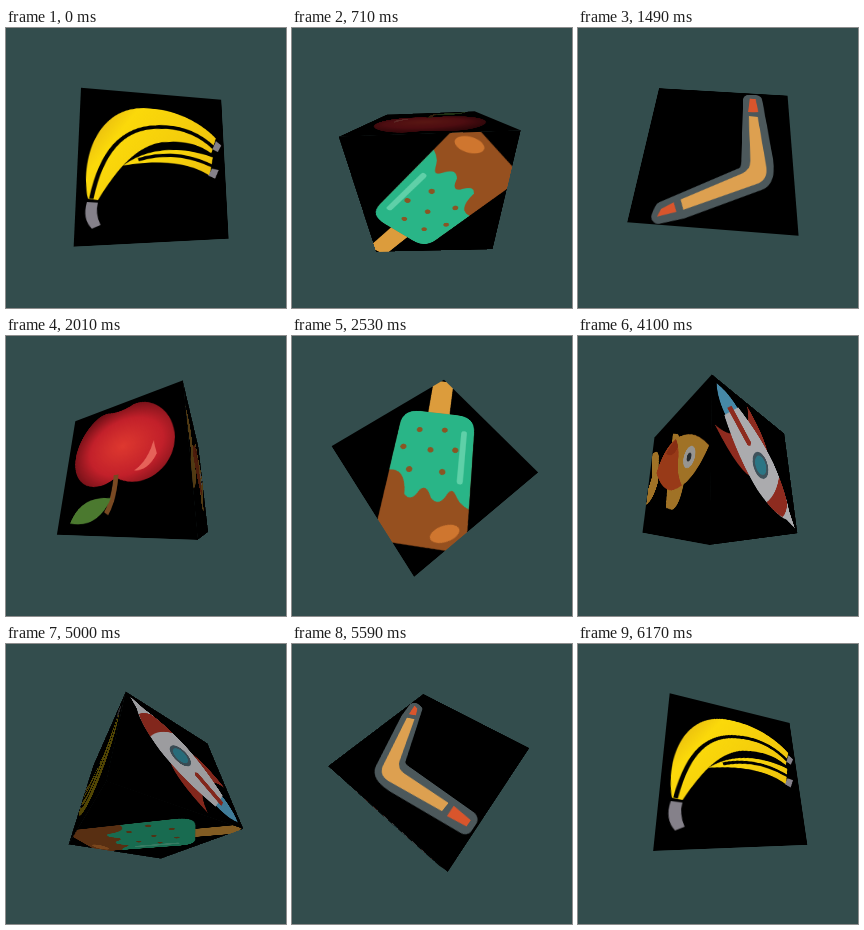
An HTML page that plays this animation: 280x280 px, repeating every 6.24 s.

```html
<!DOCTYPE html>
<html>
<head>
<meta charset="utf-8">
<title>Spinning cube</title>
<style>
  html, body { margin: 0; width: 100%; height: 100%; overflow: hidden; background: #334d4d; }
  #stage { position: absolute; left: 0; top: 0; width: 280px; height: 280px; overflow: hidden;
    perspective: 150px; perspective-origin: 140px 144px; }
  #cube { position: absolute; left: 140px; top: 144px; width: 0; height: 0; transform-style: preserve-3d; }
  #cube svg { position: absolute; left: -100px; top: -100px; width: 200px; height: 200px;
    background: #000; backface-visibility: hidden; }
</style>
</head>
<body>
<div id="stage"><div id="cube">

<!-- bananas -->
<svg viewBox="0 0 100 100" data-turn="rotateY(0deg)" data-axis="z" data-sign="-1">
  <defs><linearGradient id="peel" x1="0" y1="0" x2="1" y2=".5">
    <stop offset="0" stop-color="#d9a514"/><stop offset=".3" stop-color="#fbd90a"/><stop offset="1" stop-color="#eec30c"/>
  </linearGradient></defs>
  <path fill="url(#peel)" d="M7 72C1 44 13 12 42 11C63 10 82 18 94 30L90 41C78 33 66 33 54 34.5C36 38 24 54 13 73Z"/>
  <path fill="none" stroke="#000" stroke-width="2.6" d="M9 72C14 44 26 26 50 24C68 22 82 28 92 37"/>
  <path fill="url(#peel)" d="M28 51C44 39 66 36 91 44L88 57C72 47 50 47 28 51Z"/>
  <path fill="none" stroke="#000" stroke-width="2.2" d="M38 47C56 41 74 43 90 50"/>
  <path fill="#85818a" d="M6.5 74L13 74.5Q11.5 81 15 88L10 90Q4 84 6.5 74Z M94 32L98 35L95 40L91 38Z M90 52L95 53L92 59L87 57Z"/>
</svg>

<!-- apple -->
<svg viewBox="0 0 100 100" data-turn="rotateY(90deg)" data-axis="x" data-sign="1">
  <defs><radialGradient id="skin" cx=".45" cy=".45" r=".6">
    <stop offset="0" stop-color="#e0392f"/><stop offset=".6" stop-color="#c4202a"/><stop offset="1" stop-color="#6d0f16"/>
  </radialGradient></defs>
  <g transform="rotate(180 50 50)">
    <path fill="url(#skin)" d="M50 38C30 26 7 38 8 62C9 81 25 97 38 95Q50 91 62 95C76 97 92 78 92 60C92 38 70 26 50 38Z"/>
    <path fill="#e8635a" d="M20 50Q26 39 36 41Q26 46 22 60Z"/>
    <path fill="none" stroke="#7a4a22" stroke-width="4" d="M50 40Q50 24 56 14"/>
    <path fill="#4c7a2f" d="M53 24Q62 4 88 8Q80 28 53 24Z"/>
  </g>
</svg>

<!-- goldfish -->
<svg viewBox="0 0 100 100" data-turn="rotateY(180deg)" data-axis="z" data-sign="1">
  <g transform="rotate(180 50 50)">
    <g fill="#ffb63c">
      <path d="M27 37Q31 19 42 18L52 20L54 38Z"/>
      <path d="M34 66L42 77L52 82L51 66Z"/>
      <path d="M77 54L74 44Q82 28 99.5 26L99 42L92 53L97 65L99.5 80Q84 80 80 71L77 59Z"/>
    </g>
    <path fill="#f25c26" d="M2 51Q18 31 45 32Q64 35 81 54Q68 74 46 74Q20 72 2 51Z"/>
    <path fill="#d94a1e" d="M36 73Q42 54 62 67Q54 74 36 73Z"/>
    <path fill="#ffb63c" d="M2 51Q14 36 30 33Q39 43 38 54Q38 65 45 74Q20 72 2 51Z"/>
    <circle cx="23" cy="51" r="7.500" fill="#f1eee8"/>
    <circle cx="23" cy="51" r="3" fill="#39414a"/>
  </g>
</svg>

<!-- rocket, nose toward the lower right -->
<svg viewBox="0 0 100 100" data-turn="rotateY(-90deg)" data-axis="x" data-sign="-1">
  <g transform="rotate(-45)">
    <path fill="#5fb9e4" d="M-9 34Q-10 16 0 6Q10 16 9 34Z"/>
    <path fill="#c23a2a" d="M-14 72Q-27 62 -23 27Q-18 36 -10 38Z M14 72Q27 62 23 27Q18 36 10 38Z"/>
    <path fill="#e9e9ee" d="M-10 25H10Q20 52 19 78Q16 104 5 120L0 135L-5 120Q-16 104 -19 78Q-20 52 -10 25Z"/>
    <path fill="#c23a2a" d="M-17 91Q0 97 17 91Q14 105 8 114Q0 117 -8 114Q-14 105 -17 91Z M-3 22H3V50Q0 54 -3 50Z"/>
    <circle cy="69" r="10.500" fill="#56707c"/>
    <circle cy="69" r="7.500" fill="#3a9fb4"/>
  </g>
</svg>

<!-- ice pop -->
<svg viewBox="0 0 100 100" data-turn="rotateX(90deg)" data-axis="y" data-sign="-1">
  <g transform="rotate(-45)">
    <rect x="-8" y="2" width="16" height="40" rx="5" fill="#dc9c3c"/>
    <rect x="-27" y="33" width="54" height="93" rx="13" fill="#96501f"/>
    <path fill="#29b587" d="M-27 46Q-27 33 -14 33H14Q27 33 27 46V101Q21 99 18 93Q15 88 12 95Q8 102 3 97Q-1 88 -5 93Q-9 102 -14 97Q-16 80 -27 82Z"/>
    <path fill="none" stroke="#5fd0a8" stroke-width="4" stroke-linecap="round" d="M20 48V84"/>
    <g id="sprinkles" fill="#8a5524"></g>
    <ellipse cx="14" cy="117" rx="9" ry="4.5" fill="#cf762f" transform="rotate(-25 14 117)"/>
  </g>
</svg>

<!-- boomerang -->
<svg viewBox="0 0 100 100" data-turn="rotateX(-90deg)" data-axis="y" data-sign="1">
  <g transform="rotate(180 50 50)" stroke-linejoin="round">
    <path fill="#4c585b" stroke="#4c585b" stroke-width="9" d="M70.5 6L76 6L82 50Q85 68 77 71L32 91L18 95L19 91L66 66Q71 64 70.5 55Z"/>
    <path fill="#dda050" d="M70.5 21L77 21L82.5 60Q83 68 77 71L32 90.5L29.5 84.5L67 65Q72 62 72 56Z"/>
    <path fill="#d9552c" d="M71 5L75.5 5L77.5 17L70 17.5Z M17 95.5L18.5 91L25.5 86.5L28 92Z"/>
  </g>
</svg>

</div></div>
<script>
const LOOP = 6240, STEP = 65, STEPS = LOOP / STEP;
const cube = document.getElementById('cube');
const faces = [...cube.querySelectorAll('svg')];
// The slight overscale closes the seams along the edges.
for (const f of faces) f.style.transform = f.dataset.turn + ' translateZ(50px) scale(.502)';

document.getElementById('sprinkles').innerHTML =
  [[-12, 49], [6, 47], [-21, 64], [-2, 64], [15, 62], [-14, 80], [8, 79]]
    .map(([x, y]) => `<circle cx="${x}" cy="${y}" r="2.1"/>`).join('');

// Light sits at the camera, 1.5 edges from the cube's centre.
function brightness(depth) {
  const cos = -(1.5 * depth + 0.5) / Math.sqrt(2.5 + 1.5 * depth);
  return Math.min(1, 0.25 + Math.max(0, cos));
}

function draw(now) {
  const ms = now % LOOP;
  const step = Math.min(STEPS - 1, Math.floor((ms + 10) / STEP));
  const t = Math.min(ms, step * STEP) / 1000;
  const a = -0.1 + 3.028 * t, b = -0.138 - 2.063 * t;
  cube.style.transform = `rotateX(${-a}rad) rotateY(${-b}rad)`;
  const depth = { x: -Math.cos(a) * Math.sin(b), y: Math.sin(a), z: Math.cos(a) * Math.cos(b) };
  for (const f of faces)
    f.style.filter = `brightness(${brightness(depth[f.dataset.axis] * f.dataset.sign).toFixed(3)})`;
}

const start = performance.now();
function tick() {
  draw(performance.now() - start);
  requestAnimationFrame(tick);
}
tick();
</script>
</body>
</html>
```
